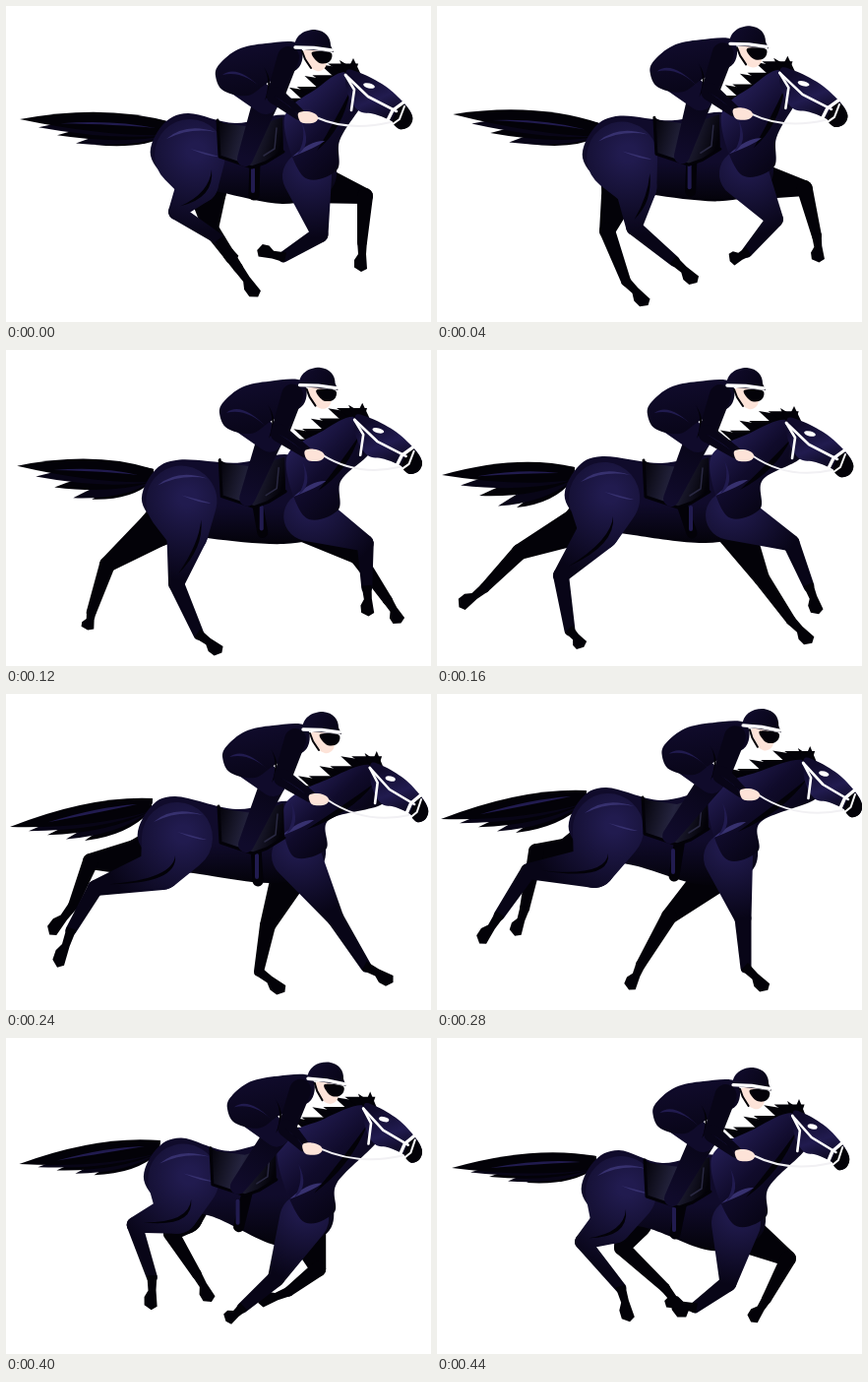
An HTML page with a canvas for the animation above (480 ms loop, 432x321 px).

```html
<!DOCTYPE html>
<html lang="en">
<head>
<meta charset="utf-8">
<title>Galloping horse</title>
<style>
html, body { margin: 0; width: 100%; height: 100%; overflow: hidden; background: #fff; }
canvas { display: block; width: 432px; height: 321px; }
</style>
</head>
<body>
<canvas id="stage" width="432" height="321"></canvas>
<script>
const c = document.getElementById('stage').getContext('2d');
const STEP = 40, STEPS = 12;
const KEYS = [0, 2, 4, 6, 7, 9, 11];
const INK = '#030208', DEEP = '#080517', NAVY = '#100b2b', BLUE = '#211b4f', GLOW = '#37316f';
const SKIN = '#fde3d8', WHITE = '#fff';

// Anchor positions at the key steps
const track = {
  rump: [[185,109],[185,114],[168,108],[172,104],[172,95],[172,90],[185,114]],
  saddle: [[215,116],[224,112],[210,112],[216,114],[209,105],[206,100],[211,124]],
  chest: [[336,165],[345,162],[328,160],[325,156],[326,158],[332,168],[334,180]],
  nose: [[413,116,1],[422,114,1],[423,120,1],[429,121,.87],[432,116,.88],[426,110,.92],[419,125,.85]],
  rider: [[0,0,0],[8,-6,0],[1,-6,0],[8,-6,0],[17,-9,.06],[17,-6,.1],[7,6,.02]],
  hand: [[307,113],[315,107],[312,107],[318,107],[318,102],[310,105],[313,119]],
  foot: [[252,200],[261,194],[259,194],[256,198],[241,193],[234,192],[242,207]],
  dock: [[162,123],[156,126],[134,124],[143,111],[146,103],[147,95],[156,125]],
  tail: [[14,115,20],[17,110,26],[5,127,27],[4,135,8],[4,127,8],[11,122,4],[15,132,9]]
};

// Leg joints at the key steps: x, y pairs from the top down to the toe
const hindNear = [
  [195,180,173,209,218,238,234,259], [202,188,211,238,245,282,273,304],
  [165,183,126,229,135,285,150,301], [158,178,91,197,66,240,53,278],
  [160,176,93,180,63,225,44,254], [172,168,116,175,112,230,103,260],
  [178,188,148,207,187,254,197,288]];
const hindFar = [
  [205,188,208,226,236,266,257,295], [166,183,132,226,140,285,160,304],
  [145,178,84,205,48,242,23,262], [135,166,86,170,68,215,45,245],
  [135,165,101,160,89,218,80,246], [162,174,147,184,152,228,160,254],
  [200,186,188,213,232,254,254,283]];
const foreNear = [
  [319,232,282,255,255,249], [362,204,346,248,340,273], [360,196,378,240,389,268],
  [335,228,366,277,394,292], [311,228,314,278,337,300], [264,236,233,272,234,304],
  [296,249,262,274,231,268]];
const foreFar = [
  [365,193,362,240,362,270], [375,188,399,236,405,259], [330,232,360,275,382,297],
  [266,235,257,282,284,302], [236,226,207,275,196,301], [277,238,243,250,204,255],
  [357,224,335,265,320,289]];

// Cyclic cubic interpolation between key poses
function sample(rows, t) {
  const n = KEYS.length;
  let i = n - 1;
  while (KEYS[i] > t) i--;
  const time = k => KEYS[(k + n) % n] + STEPS * Math.floor(k / n);
  const row = k => rows[(k + n) % n];
  const [ta, tb, tc, td] = [time(i - 1), time(i), time(i + 1), time(i + 2)];
  const u = (t - tb) / (tc - tb), d = tc - tb, u2 = u * u, u3 = u2 * u;
  return row(i).map((b, j) => {
    const a = row(i - 1)[j], e = row(i + 1)[j], f = row(i + 2)[j];
    const m0 = (e - a) / (tc - ta) * d, m1 = (f - b) / (td - tb) * d;
    return (2*u3 - 3*u2 + 1) * b + (u3 - 2*u2 + u) * m0 + (3*u2 - 2*u3) * e + (u3 - u2) * m1;
  });
}

const at = (p, x, y) => [p[0] + x, p[1] + y];
const mix = (a, b, k) => [a[0] + (b[0] - a[0]) * k, a[1] + (b[1] - a[1]) * k];
const pairs = v => v.reduce((r, x, i) => (i % 2 ? r.push([v[i - 1], x]) : 0, r), []);

function poly(pts, fill) {
  c.beginPath();
  pts.forEach(p => c.lineTo(...p));
  c.fillStyle = fill;
  c.fill();
}

function blob(pts, fill) {
  const n = pts.length, g = i => pts[(i + n) % n];
  c.beginPath();
  c.moveTo(...pts[0]);
  for (let i = 0; i < n; i++) {
    const a = g(i - 1), b = g(i), d = g(i + 1), e = g(i + 2);
    c.bezierCurveTo(b[0] + (d[0] - a[0]) / 6, b[1] + (d[1] - a[1]) / 6,
      d[0] - (e[0] - b[0]) / 6, d[1] - (e[1] - b[1]) / 6, d[0], d[1]);
  }
  c.fillStyle = fill;
  c.fill();
}

// Tapered limb segment with round ends
function limb(a, b, r, s, fill) {
  const dir = Math.atan2(b[1] - a[1], b[0] - a[0]);
  const len = Math.hypot(b[0] - a[0], b[1] - a[1]);
  const w = Math.acos(Math.max(-1, Math.min(1, (r - s) / (len || 1))));
  c.beginPath();
  c.arc(a[0], a[1], r, dir + w, dir - w + 2 * Math.PI);
  c.arc(b[0], b[1], s, dir - w, dir + w);
  c.closePath();
  c.fillStyle = fill;
  c.fill();
}

function line(pts, color, width) {
  c.beginPath();
  pts.forEach(p => c.lineTo(...p));
  c.strokeStyle = color;
  c.lineWidth = width;
  c.lineJoin = c.lineCap = 'round';
  c.stroke();
}

function sheen(a, q, b, thick, fill) {
  c.beginPath();
  c.moveTo(...a);
  c.quadraticCurveTo(...q, ...b);
  c.quadraticCurveTo(q[0] + thick, q[1] + thick, ...a);
  c.fillStyle = fill;
  c.fill();
}

function glow(p, r, inner, outer) {
  const g = c.createRadialGradient(p[0], p[1], r * .1, p[0], p[1], r);
  g.addColorStop(0, inner);
  g.addColorStop(1, outer);
  return g;
}

function ramp(a, b, ...colors) {
  const g = c.createLinearGradient(...a, ...b);
  colors.forEach((v, i) => g.addColorStop(i / (colors.length - 1), v));
  return g;
}

function leg(root, joints, radii, fill) {
  const pts = [root, ...joints], n = pts.length;
  for (let i = 0; i < n - 2; i++) limb(pts[i], pts[i + 1], radii[i], radii[i + 1], fill);
  const f = pts[n - 2], toe = pts[n - 1];
  const len = Math.hypot(toe[0] - f[0], toe[1] - f[1]);
  const x = (toe[0] - f[0]) / len, y = (toe[1] - f[1]) / len;
  const on = (k, s) => [f[0] + x * k - y * s, f[1] + y * k + x * s];
  poly([on(-2, 5), on(len * .4, 4), on(len * .6, 8), on(len * .85, 8), on(len, 1),
    on(len * .9, -5), on(len * .4, -4), on(-2, -5)], INK);
}

function drawTail(dock, [x, y, spread]) {
  for (let i = 4; i >= 0; i--) {
    const tip = [x + i * 19, y + spread * Math.min(1, i / 3) + i * 1.5];
    const mid = mix(dock, tip, .5);
    c.beginPath();
    c.moveTo(dock[0] + 6, dock[1] - 5);
    c.quadraticCurveTo(mid[0] + 12, mid[1] - 20 + i * 2, ...tip);
    c.quadraticCurveTo(mid[0] + 12, mid[1] + 14, dock[0] + 4, dock[1] + 8);
    c.fillStyle = i % 2 ? DEEP : INK;
    c.fill();
  }
  const end = mix(dock, [x, y], .72), mid = mix(dock, end, .5);
  sheen(at(dock, -10, 1), at(mid, 0, -5), at(end, 0, 2), 5, BLUE);
}

function drawBody(P) {
  const { rump: r, saddle: s, chest: k } = P;
  const barrel = ramp([0, r[1] + 5], [0, k[1] + 38], NAVY, NAVY, INK);
  blob([at(r, -38, 43), at(r, -26, 12), r, at(s, 18, 3), at(s, 72, -5), at(k, -14, -28), k,
    at(k, -10, 25), at(k, -55, 36), at(r, 32, 80), at(r, -14, 70)], barrel);
}

function drawNeck(P) {
  const { saddle: s, chest: k, nose: n } = P;
  const h = (x, y) => [n[0] + x * n[2], n[1] + y];
  const withers = at(s, 68, -2), poll = h(-67, -49);
  for (let i = 0; i < 7; i++) {
    const b = mix(withers, poll, .22 + i * .125), up = at(b, 0, -4);
    poly([at(up, -17, -6 - i % 2 * 5), at(up, 14, -6), at(up, 8, 12)], INK);
  }
  blob([withers, at(mix(withers, poll, .55), -1, -5), poll, h(-42, -26), h(-56, -8),
    at(k, 3, -28), at(k, 0, 2), at(k, -34, 8)], ramp(withers, k, BLUE, NAVY, DEEP));
  sheen(at(k, -20, -18), at(mix(k, poll, .5), -6, 0), h(-63, -30), 8, INK);
  sheen(at(k, -45, -12), at(k, -26, -29), at(k, -12, -28), 7, GLOW);
  sheen(at(k, -36, -48), at(k, -30, -30), at(k, -40, -14), 6, BLUE);
}

function drawHead(n) {
  const h = ([x, y]) => [n[0] + x * n[2], n[1] + y];
  poly([[-74,-61],[-64,-55],[-60,-63],[-52,-46],[-66,-42]].map(h), INK);
  blob([[-67,-50],[-53,-48],[-28,-35],[-8,-17],[0,-4],[-3,6],[-13,9],[-21,1],[-38,-6],[-55,-10],[-66,-28]].map(h),
    ramp(h([-50, -45]), h([-30, 5]), NAVY, BLUE, DEEP));
  blob([[-10,-16],[0,-4],[-3,6],[-13,9],[-20,0]].map(h), INK);
  c.beginPath();
  c.ellipse(...h([-44, -35]), 6 * n[2], 2.5, .25, 0, 7);
  c.fillStyle = WHITE;
  c.fill();
  line([[-68,-46],[-59,-31],[-62,-10]].map(h), WHITE, 2.6);
  line([[-68,-46],[-45,-24],[-16,-9]].map(h), WHITE, 2.6);
  line([[-25,0],[-20,-10],[-9,-18]].map(h), WHITE, 3.4);
  line([[-20,4],[-13,-1],[-8,-14]].map(h), WHITE, 2);
}

function drawSaddle({ saddle: s, foot }) {
  const p = [[0,0],[6,3],[35,7],[66,-3],[67,32],[49,43],[35,48],[2,37]].map(v => at(s, ...v));
  line([at(s, 38, 42), at(foot, 0, -8)], INK, 11);
  line([at(foot, -1, -34), at(foot, -1, -12)], BLUE, 4);
  poly(p, ramp(s, at(s, 66, 20), INK, '#25243f', INK));
  line([p[0], p[7], p[6], p[5], p[4]], INK, 3);
  line([at(s, 60, 8), at(s, 58, 29), at(s, 47, 36)], '#2a2942', 1.5);
}

function drawRider({ rider: [x, y, tilt], hand, saddle: s }) {
  const r = (a, b) => {
    const u = a - 245, v = b - 90;
    return [245 + x * .9 + u - v * tilt * .3, 90 + y + v + u * tilt * .15];
  };
  const knee = r(264, 97), hip = r(232, 70), elbow = r(274, 91);
  limb(knee, at(s, 28, 39), 13, 8, ramp(knee, at(s, 28, 39), DEEP, NAVY));
  limb(hip, knee, 17, 13, NAVY);
  blob([[297,38],[264,38],[236,44],[217,59],[213,71],[221,86],[246,91],[266,78],[298,62]].map(p => r(...p)),
    ramp(r(240, 42), r(250, 95), NAVY, DEEP));
  sheen(r(220, 70), r(235, 58), r(262, 86), 7, BLUE);
  sheen(r(262, 62), r(270, 75), r(263, 96), 4, INK);
  limb(r(287, 52), elbow, 11, 9, DEEP);
  limb(elbow, at(hand, -9, -3), 9, 6, DEEP);
  sheen(r(272, 91), at(mix(elbow, hand, .5), 0, 0), at(hand, -10, -2), 3, BLUE);
  blob([[-10,-4],[-1,-6],[8,-3],[10,2],[4,6],[-7,5]].map(p => at(hand, ...p)), SKIN);

  c.save();
  c.translate(313 + x, 44 + y);
  c.rotate(tilt);
  blob([[-10,1],[12,4],[13,14],[10,20],[3,22],[-7,15]], SKIN);
  blob([[-2,3],[16,3],[18,9],[13,14],[4,13]], INK);
  line([[-12, 2], [-9, 10], [-3, 19]], INK, 2);
  c.beginPath();
  c.moveTo(-20, -1);
  c.bezierCurveTo(-20, -14, -10, -20, 1, -20);
  c.bezierCurveTo(12, -19, 17, -12, 17, -4);
  c.lineTo(20, 3);
  c.closePath();
  c.fillStyle = ramp([-15, -18], [15, 0], NAVY, DEEP);
  c.fill();
  line([[-19, -2], [0, -1.5], [18, 1]], WHITE, 3.4);
  c.restore();
}

function draw(step) {
  const P = {};
  for (const k in track) P[k] = sample(track[k], step);
  const { rump: r, chest: k, nose: n, hand } = P;
  const joints = rows => pairs(sample(rows, step));
  c.fillStyle = WHITE;
  c.fillRect(0, 0, 432, 321);

  drawTail(P.dock, P.tail);
  leg(at(r, 8, 48), joints(hindFar), [30, 19, 8, 5], INK);
  leg(at(k, -30, 13), joints(foreFar), [22, 8, 5], INK);
  drawBody(P);
  const thigh = at(r, 2, 42), shoulder = at(k, -30, 8);
  const near = joints(hindNear);
  leg(thigh, near, [36, 21, 8, 5.5], glow(at(r, 8, 38), 85, BLUE, DEEP));
  sheen(at(r, -22, 26), at(r, -2, 9), at(r, 28, 19), 5, GLOW);
  sheen(at(r, 2, 36), at(r, 18, 40), at(r, 32, 44), 5, GLOW);
  sheen(at(near[0], 14, -14), at(near[0], 12, 10), mix(near[0], near[1], .8), 5, INK);
  leg(shoulder, joints(foreNear), [25, 8.5, 5.5], glow(at(k, -28, -4), 75, BLUE, DEEP));
  drawNeck(P);
  drawHead(n);
  drawSaddle(P);

  const bit = [n[0] - 22 * n[2], n[1] + 2];
  c.beginPath();
  c.moveTo(hand[0] + 8, hand[1]);
  c.quadraticCurveTo((hand[0] + bit[0]) / 2, Math.max(hand[1], bit[1]) + 10, ...bit);
  c.strokeStyle = '#f1f0f3';
  c.lineWidth = 2;
  c.stroke();
  drawRider(P);
}

function tick() {
  draw(Math.floor(performance.now() / STEP) % STEPS);
  requestAnimationFrame(tick);
}
tick();
</script>
</body>
</html>
```
